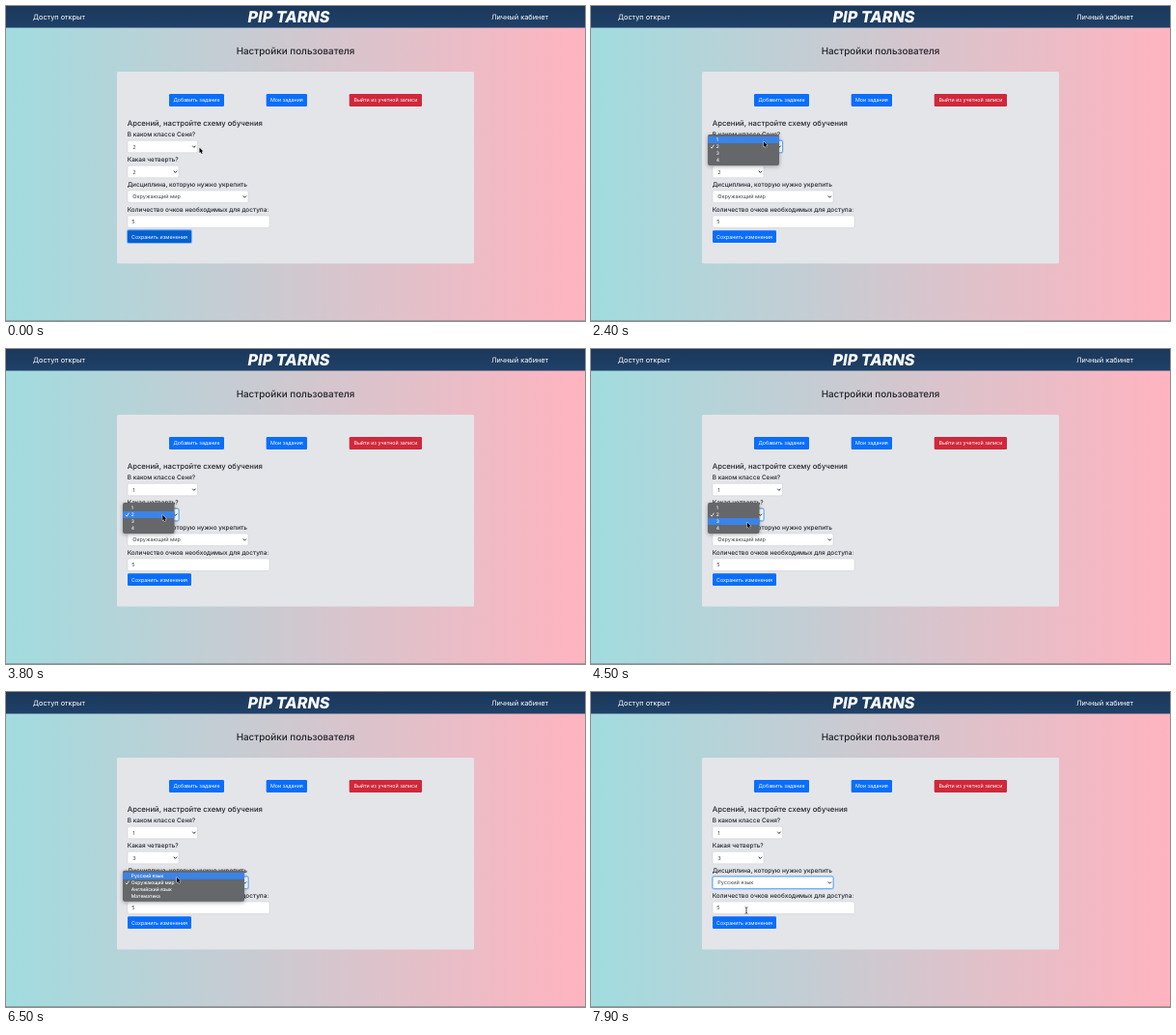
Write an HTML page with a canvas that moves like this. It is 600 by 326 pixels and loops after 8 s.

```html
<!DOCTYPE html>
<html lang="ru">
<head>
<meta charset="utf-8">
<title>Настройки пользователя</title>
<style>
  html, body { margin: 0; width: 100%; height: 100%; overflow: hidden; background: #d0c8d0; }
  canvas { display: block; width: 600px; height: 326px; }
</style>
</head>
<body>
<canvas id="stage"></canvas>
<script>
const W = 600, H = 326, LOOP = 8000, STEP = 100, ROW = 7, FADE = 300;
const canvas = document.getElementById('stage');
const ctx = canvas.getContext('2d');
const dpr = window.devicePixelRatio || 1;
canvas.width = W * dpr;
canvas.height = H * dpr;

const INK = '#20242a', BLUE = '#0a6efa', RED = '#d0283a';
const LEVELS = ['1', '2', '3', '4'];

// Each select: geometry, value before and after the pick, time of opening and picking
const selects = [
  { y: 145.5, w: 72.5, menuW: 74, items: LEVELS, pick: 0, open: 1000, click: 2950 },
  { y: 171.5, w: 53, menuW: 53.5, items: LEVELS, pick: 2, open: 3800, click: 4700 },
  { y: 197.3, w: 125, menuW: 126, pick: 0, open: 5800, click: 6900,
    items: ['Русский язык', 'Окружающий мир', 'Английский язык', 'Математика'] }
];
const CHECKED = 1;

// Pointer path: time, x, y
const path = [
  [0, 200.5, 146.5], [800, 200.5, 146.5], [1100, 187, 145.5], [2000, 187, 145.5],
  [2600, 176, 138.5], [2950, 175.5, 139], [3100, 174.7, 144.8], [3600, 163, 171],
  [3900, 162, 172], [4300, 161.8, 179], [4700, 161.8, 179.8], [5300, 176, 192.5],
  [5500, 176.5, 193.3], [5800, 176.8, 194.5], [6300, 177, 191.8], [6900, 177, 191.5],
  [7500, 163, 223], [7900, 161, 226]
];

function pointerAt(t) {
  let i = 0;
  while (i < path.length - 2 && t > path[i + 1][0]) i++;
  const [t0, x0, y0] = path[i], [t1, x1, y1] = path[i + 1];
  const k = Math.min(1, Math.max(0, (t - t0) / (t1 - t0)));
  const e = k * k * (3 - 2 * k);
  return { x: x0 + (x1 - x0) * e, y: y0 + (y1 - y0) * e };
}

// y is the middle of the capitals
function text(str, x, y, size, { color = INK, weight = 400, align = 'left', style = '' } = {}) {
  ctx.font = `${style} ${weight} ${size}px Inter, "Open Sans", sans-serif`;
  ctx.textAlign = align;
  ctx.fillStyle = color;
  ctx.fillText(str, x, y + size * 0.364);
}

function box(x, y, w, h, r, fill, stroke, line = 0.5) {
  ctx.beginPath();
  ctx.roundRect(x, y, w, h, r);
  if (fill) { ctx.fillStyle = fill; ctx.fill(); }
  if (stroke) { ctx.strokeStyle = stroke; ctx.lineWidth = line; ctx.stroke(); }
}

function polyline(points, color, width) {
  ctx.beginPath();
  points.forEach(([x, y]) => ctx.lineTo(x, y));
  ctx.strokeStyle = color;
  ctx.lineWidth = width;
  ctx.stroke();
}

function button(label, x, y, w, h, color) {
  box(x, y, w, h, 1.3, color);
  text(label, x + w / 2, y + h / 2, 5.33, { color: '#fff', align: 'center' });
}

function field(x, y, w, value, focused, size = 5.55, pad = 5.3) {
  const top = y - 6.3, h = 12.6;
  if (focused) box(x - 0.9, top - 0.9, w + 1.8, h + 1.8, 2.2, 'rgba(0,123,255,0.28)');
  box(x, top, w, h, 1.6, '#fff', focused ? '#55a2fa' : '#c6cbd2', focused ? 0.9 : 0.5);
  text(value, x + pad, y, size, { color: '#41474e' });
}

function backdrop() {
  const sky = ctx.createLinearGradient(0, 0, W, 0);
  sky.addColorStop(0, '#a1dcdf');
  sky.addColorStop(1, '#ffb4c0');
  ctx.fillStyle = sky;
  ctx.fillRect(0, 0, W, H);
  ctx.fillStyle = 'rgba(110,115,125,0.5)';
  ctx.fillRect(0, 325, W, 1);

  const bar = ctx.createLinearGradient(0, 0, 0, 22);
  bar.addColorStop(0, '#1b385b');
  bar.addColorStop(1, '#1f4067');
  ctx.fillStyle = bar;
  ctx.fillRect(0, 0, W, 22.5);
  text('Доступ открыт', 28, 11.2, 7.35, { color: '#fff' });
  text('PIP TARNS', 293, 11, 16.2, { color: '#fff', weight: 800, align: 'center', style: 'italic' });
  text('Личный кабинет', 562, 11.2, 7.35, { color: '#fff', align: 'right' });
  text('Настройки пользователя', 300, 46, 9.9, { weight: 500, align: 'center' });
}

function form(t) {
  box(115, 68, 370, 198.5, 1.5, '#e4e5e9');
  button('Добавить задание', 169, 91, 57, 13, BLUE);
  button('Мои задания', 269.7, 91, 42.3, 13, BLUE);
  button('Выйти из учетной записи', 355.7, 91, 75.3, 13, RED);

  text('Арсений, настройте схему обучения', 125.7, 121.5, 7.7, { weight: 500 });
  ['В каком классе Сеня?', 'Какая четверть?', 'Дисциплина, которую нужно укрепить',
   'Количество очков необходимых для доступа:'
  ].forEach((label, i) => text(label, 125.7, 132.7 + i * 25.95, 6.45, { weight: 500 }));

  selects.forEach((s, i) => {
    const next = selects[i + 1];
    const focused = t >= s.open && (!next || t < next.open);
    const value = s.items[t >= s.click + 200 ? s.pick : CHECKED];
    field(126, s.y, s.w, value, focused);
    const cx = 126 + s.w - 3.6;
    polyline([[cx - 1.6, s.y - 0.8], [cx, s.y + 0.9], [cx + 1.6, s.y - 0.8]], '#2b2f34', 1);
  });
  field(126, 223.3, 147, '5', false, 5.55, 4.2);

  const saved = t < selects[0].open;
  if (saved) box(124.9, 231.1, 68.2, 15, 2.4, 'rgba(38,143,255,0.55)');
  button('Сохранить изменения', 126, 232.2, 66, 12.8, saved ? '#0560cf' : BLUE);
}

function menu(s, t, pointer) {
  if (t < s.open || t >= s.click + FADE) return;
  const x = 121, top = s.y - ROW * 1.5 - 2;
  const at = t < s.click ? pointer : pointerAt(s.click);
  const hover = Math.floor((at.y - top - 2) / ROW);
  ctx.save();
  ctx.globalAlpha = t < s.click ? 1 : 1 - (t - s.click) / FADE;
  ctx.shadowColor = 'rgba(0,0,0,0.35)';
  ctx.shadowBlur = 4 * dpr;
  ctx.shadowOffsetY = dpr;
  box(x, top, s.menuW, ROW * 4 + 4, 2, '#65676a');
  ctx.shadowColor = 'transparent';
  s.items.forEach((item, i) => {
    const y = top + 2 + ROW * (i + 0.5);
    if (i === hover) {
      ctx.fillStyle = '#3a84e8';
      ctx.fillRect(x, y - ROW / 2, s.menuW, ROW);
    }
    text(item, x + 8.8, y, 4.95, { color: '#fff', weight: 500 });
    if (i === CHECKED) polyline([[x + 3, y + 0.2], [x + 4.2, y + 1.7], [x + 6.4, y - 1.8]], '#fff', 0.8);
  });
  ctx.restore();
}

function arrow({ x, y }) {
  ctx.save();
  ctx.translate(x, y);
  ctx.beginPath();
  [[0, 0], [0, 5.6], [1.25, 4.5], [2.1, 6.5], [3.1, 6.1], [2.25, 4.1], [3.9, 4]]
    .forEach(p => ctx.lineTo(...p));
  ctx.closePath();
  ctx.strokeStyle = 'rgba(255,255,255,0.9)';
  ctx.lineWidth = 0.9;
  ctx.stroke();
  ctx.fillStyle = '#000';
  ctx.fill();
  ctx.restore();
}

function caret({ x, y }) {
  polyline([[x, y - 2.9], [x, y + 2.9]], '#222', 0.8);
  for (const d of [-1, 1]) {
    polyline([[x - 1.4, y + d * 3.3], [x, y + d * 2.7], [x + 1.4, y + d * 3.3]], '#222', 0.7);
  }
}

function draw(now) {
  const t = Math.floor((now % LOOP) / STEP) * STEP;
  const pointer = pointerAt(t);
  ctx.setTransform(dpr, 0, 0, dpr, 0, 0);
  ctx.textRendering = 'geometricPrecision';
  backdrop();
  form(t);
  selects.forEach(s => menu(s, t, pointer));
  (pointer.y > 217 ? caret : arrow)(pointer);
}

let start;
function tick(now) {
  start ??= now;
  draw(now - start);
  requestAnimationFrame(tick);
}
draw(0);
requestAnimationFrame(tick);
</script>
</body>
</html>
```
